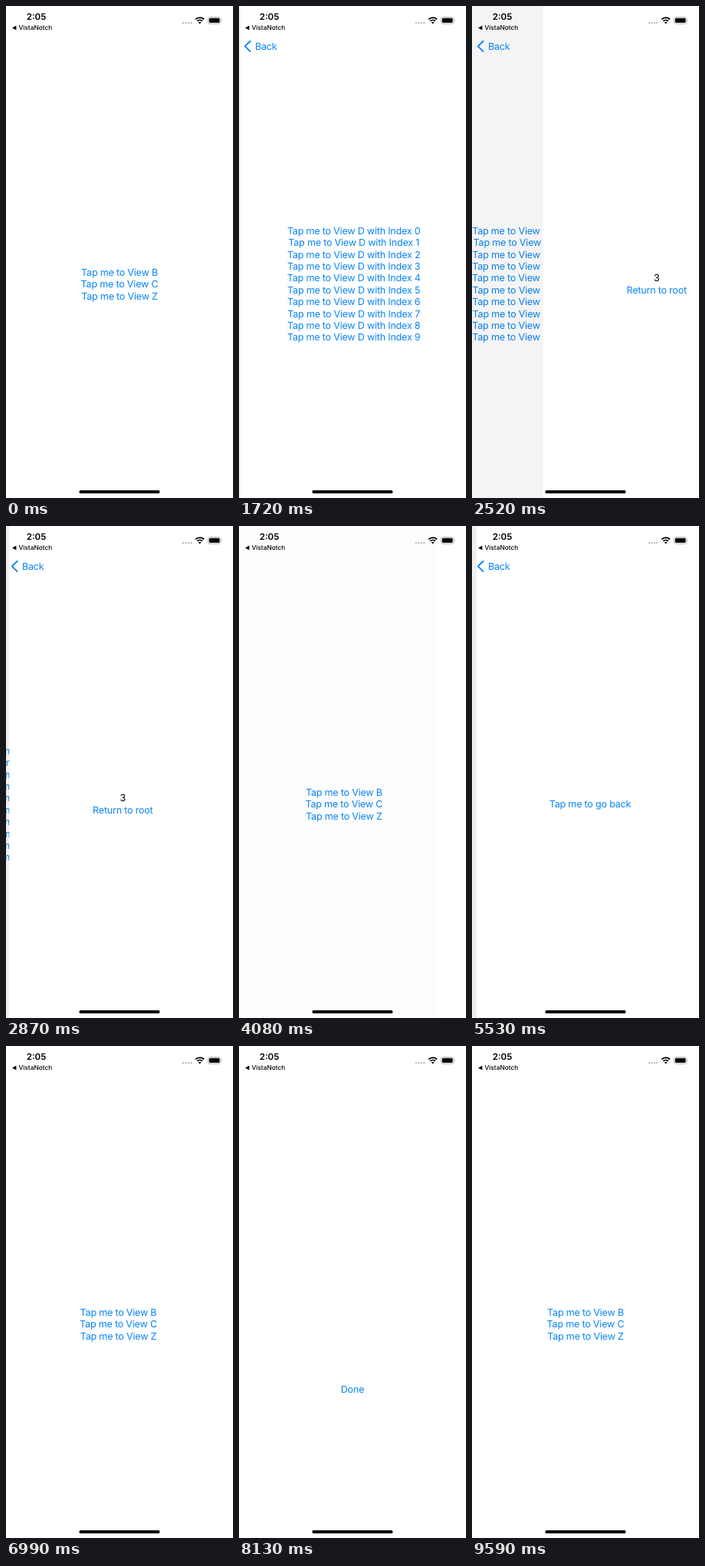
These frames come from a looping animation (296 px wide and 640 px high, 9910 ms). An HTML page:

```html
<!DOCTYPE html>
<html lang="en">
<head>
<meta charset="utf-8">
<style>
  html, body { margin: 0; width: 100%; height: 100%; overflow: hidden; background: #fff; }
  svg { display: block; width: 100vw; height: 100vh; }
  text { font-family: Inter, Roboto, "Liberation Sans", sans-serif; text-rendering: geometricPrecision; }
  .body { font-size: 12.6px; letter-spacing: -.23px; }
  .mid { text-anchor: middle; }
</style>
</head>
<body>
<svg viewBox="0 0 296 640">
  <g id="pages"></g>
  <g id="status">
    <text class="mid" x="39.5" y="17.8" font-size="11.6" font-weight="600">2:05</text>
    <path d="M8 28.4 13.4 25.6V31.2Z"/>
    <text x="16.4" y="31.3" font-size="8.3" font-weight="500">VistaNotch</text>
    <path d="M229.8 22H242.6" stroke="#bdbdbd" stroke-width="1.8" stroke-dasharray="2.2 1.3"/>
    <g fill="none" stroke="#000" stroke-width="1.8">
      <path d="M247.2 17.4A7.7 7.7 0 0 1 258.2 17.4"/>
      <path d="M249.4 19.7A4.7 4.7 0 0 1 256 19.7"/>
    </g>
    <path d="M252.7 23.2 250.9 21.4A2.5 2.5 0 0 1 254.5 21.4Z"/>
    <rect x="263.4" y="14.4" width="16.6" height="8.8" rx="2.5" fill="none" stroke="#a6a6a6" stroke-width=".8"/>
    <rect x="264.8" y="15.8" width="13.8" height="6" rx="1.4"/>
    <path d="M280.9 17.3Q282.3 18.8 280.9 20.3Z" fill="#a6a6a6"/>
    <rect x="95.4" y="630.1" width="105.2" height="3.8" rx="1.9"/>
  </g>
</svg>
<script>
const LOOP = 9910, W = 296, BLUE = "#0884f7", ROW = 15.4, PRESSED = 0.17;
const pages = document.getElementById("pages");

// The screen refreshes only at these moments.
const ticks = [
  0, 1230, 1490, 1600, 1720, 1830,
  2390, 2500, 2620, 2740, 2870, 2970, 3070,
  3850, 3960, 4070, 4180, 4290, 4400, 4500,
  5090, 5200, 5310, 5420, 5530, 5650, 5760,
  6530, 6640, 6760, 6870, 6990, 7100, 7200,
  7780, 8020, 8130, 8240, 8360, 8470,
  9260, 9480, 9590
];

const views = {
  root: ["B", "C", "Z"].map(v => "Tap me to View " + v),
  list: Array.from({ length: 10 }, (_, i) => "Tap me to View D with Index " + i),
  detail: ["3", "Return to root"],
  leaf: ["Tap me to go back"],
  cover: ["Done"]
};

// Navigation: start time, page left, page reached, pressed row.
const moves = [
  { at: 1128, press: 1230, first: 1490, from: "root", to: "list", row: 0 },
  { at: 2390, from: "list", to: "detail", row: 3 },
  { at: 3850, from: "detail", to: "root", row: 1, pop: true },
  { at: 5090, from: "root", to: "leaf", row: 1 },
  { at: 6530, from: "leaf", to: "root", row: 0, pop: true }
];

function page(name, x = 0, y = 0, row = -1, alpha = PRESSED) {
  const rows = views[name];
  const mid = name === "cover" ? 329.8 : 366.1;
  const top = mid - (rows.length - 1) * ROW / 2;
  const lines = rows.map((s, i) =>
    `<text class="body mid" x="148" y="${top + i * ROW}" fill="${s === "3" ? "#000" : BLUE}"
      opacity="${i === row ? alpha : 1}">${s}</text>`).join("");
  return `<g transform="translate(${x} ${y})"><rect width="${W}" height="640" fill="#fff"/>${lines}</g>`;
}

const shade = part =>
  `<rect width="${W}" height="640" opacity="${0.065 * part}"/>`;

const backButton = alpha =>
  `<g opacity="${alpha}"><path d="M14.6 45.7 7.8 52.4 14.6 59.1" fill="none" stroke="${BLUE}"
    stroke-width="1.9" stroke-linecap="round" stroke-linejoin="round"/>
    <text class="body" x="21" y="57" fill="${BLUE}">Back</text></g>`;

// Distance still to travel after d milliseconds.
const remaining = d => d >= 660 ? 0 : 231 * Math.exp(-d / 120.5);

const barAlpha = name => name === "root" ? 0 : 1;

function navigate(t) {
  const m = moves.filter(m => t >= (m.press || m.at)).pop();
  if (!m) return page("root");
  const started = t >= (m.first || m.at + 1);
  if (!started) return page(m.from, 0, 0, m.row) + backButton(barAlpha(m.from));
  const rest = remaining(t - m.at);
  if (!rest) return page(m.to) + backButton(barAlpha(m.to));
  const x = m.pop ? W - rest : rest;
  const part = 1 - x / W;
  const [under, over] = m.pop ? [m.to, m.from] : [m.from, m.to];
  const left = (rest / W) ** 2;
  const bar = barAlpha(m.to) * (1 - left) + barAlpha(m.from) * left;
  return page(under, -0.3 * W * part) + shade(part) + page(over, x) + backButton(bar);
}

function scene(t) {
  if (t < 7780) return navigate(t);
  if (t < 8020) return page("root", 0, 0, 2);
  if (t < 9480) {
    const y = t >= 8470 ? 0 : 301 * Math.exp((8020 - t) / 120.5);
    return page("root") + page("cover", 0, y, t >= 9260 ? 0 : -1);
  }
  return page("root", 0, 0, t < 9590 ? 2 : -1, 0.6);
}

let shown = -1;
function draw() {
  const t = performance.now() % LOOP;
  const tick = ticks.filter(k => k <= t).pop();
  if (tick !== shown) {
    shown = tick;
    pages.innerHTML = scene(tick);
  }
  requestAnimationFrame(draw);
}
draw();
</script>
</body>
</html>
```
